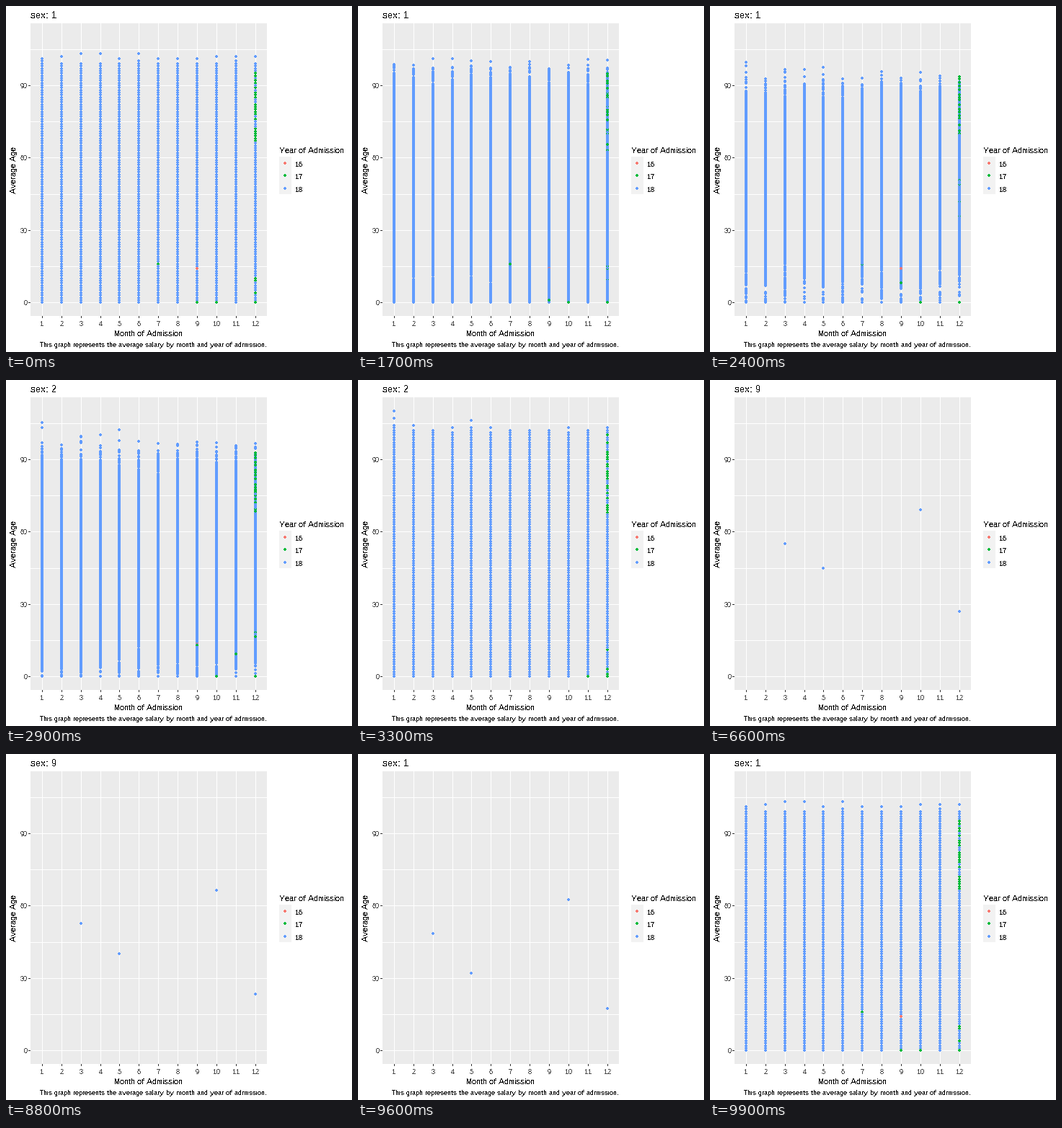
Write a matplotlib script that moves like this. It is 480 px wide and 480 px high and loops after 10000 ms.

```python
import matplotlib.pyplot as plt
import numpy as np
from matplotlib.animation import FuncAnimation
from matplotlib.colors import to_rgba
from matplotlib.patches import Rectangle

SIZE, DPI = 480, 100
PT = 72 / DPI                      # points per pixel
RED, GREEN, BLUE = "#F8766D", "#00BA38", "#619CFF"
LEFT, RIGHT, TOP, BOTTOM = 34, 362, 24, 430
FRAMES, INTERVAL = 100, 100
MONTHS = range(1, 13)

# crisp, fully hinted text
plt.rcParams.update({"font.family": "Liberation Sans",
                     "text.antialiased": False,
                     "text.hinting": "native",
                     "text.hinting_factor": 1})
rng = np.random.default_rng(18)


def px(month):
    return np.rint(22.95 + 26.9 * np.asarray(month, float))


def py(age):
    return np.rint(411.2 - 3.347 * np.asarray(age, float))


def draw_ages(top, n):
    """Random ages: some newborns, few children, a peak near 72."""
    a = np.arange(top + 1)
    w = (0.08 + np.exp(-((a - 72) / 17) ** 2)
         + 0.5 * np.exp(-((a - 30) / 14) ** 2))
    w *= np.clip((103 - a) / 22, 0.01, 1)
    w[0] = 2.5
    return rng.choice(a, n, p=w / w.sum())


def sample(low, high, n, banned=()):
    pool = np.setdiff1d(np.arange(low, high + 1), banned)
    return rng.choice(pool, n, replace=False)


def build_rows():
    """Rows of layer, month, age for sex 1, age for sex 2.

    Layers from back to front: blue crowd, red, green, blue cover.
    """
    rows = []

    def add(layer, month, a, b):
        a, b = np.broadcast_arrays(np.atleast_1d(a), b)
        rows.append(np.column_stack([np.full(a.size, layer),
                                     np.full(a.size, month), a, b]))

    # long stays of December: the oldest become young and the other way round
    old_1 = -np.sort(-sample(66, 96, 20))
    old_2 = -np.sort(-sample(68, 100, 20))
    green_1 = np.r_[0, 4, 9, 10, old_1]
    green_2 = np.r_[0, old_2, 11, 3, 1]
    add(2, 12, green_1, green_2)

    # single early admissions, seen for sex 1 and covered for sex 2
    for layer, month, a, b in ((1, 9, 14, 14), (2, 7, 16, 16),
                               (2, 9, 0, 17), (2, 10, 0, 0)):
        add(layer, month, a, b)
        add(3, month, rng.integers(45, 80), b)
    add(2, 11, 40, 0)
    add(3, 11, 40, 70)

    for m in MONTHS:
        top_1, top_2 = 99 + (m % 5 == 1), 101 + rng.integers(0, 3)
        add(0, m, draw_ages(top_1, 2000), draw_ages(top_2, 2000))
        # every age occurs, and a few people are older than the rest
        all_1, all_2 = np.arange(top_1 + 1), np.arange(top_2 + 1)
        add(0, m, all_1, draw_ages(top_2, all_1.size))
        add(0, m, draw_ages(top_1, all_2.size), all_2)
        add(0, m, rng.integers(101, 104), draw_ages(top_2, 1))
        add(0, m, rng.integers(60, 93), rng.integers(102, 105))
        december = m == 12
        add(3, m, sample(3, 90, 50, green_1 if december else (14, 16)),
            sample(3, 90, 50, green_2 if december else ()))
    for month, age in ((1, 107), (1, 110), (5, 106)):
        add(0, month, 90, age)
    return np.vstack(rows).astype(float)


ROWS = build_rows()
LAYER_RGBA = np.array([to_rgba(c) for c in (BLUE, RED, GREEN, BLUE)])

# the four patients of sex 9: month, age for sex 2, sex 9, sex 1
FEW = np.array([(3, 80, 55, 47), (5, 60, 45, 29),
                (10, 85, 69, 61), (12, 78, 27, 15)], float)


def crowd(t):
    """Visible dots of everyone, t of the way from sex 1 to sex 2."""
    layer, month, a, b = ROWS.T
    y = py(a + (b - a) * t)
    spots = np.unique(np.column_stack([layer, month, y]), axis=0)
    xy = np.column_stack([px(spots[:, 1]), spots[:, 2]])
    return xy, LAYER_RGBA[spots[:, 0].astype(int)]


def few(start, end, t):
    a, b = FEW[:, start], FEW[:, end]
    xy = np.column_stack([px(FEW[:, 0]), py(a + (b - a) * t)])
    return xy, np.tile(LAYER_RGBA[0], (len(xy), 1))


def scene(i):
    """Title digit, dot places and dot colours at step i."""
    if i < 50:
        t = np.clip((i - 16) / 17, 0, 1)
        return "1" if t < 0.5 else "2", *crowd(t)
    if i < 66:
        t = (i - 49) / 17
        xy, col = crowd(1)
        xy4, col4 = few(1, 2, t)
        return ("2" if t < 0.5 else "9",
                np.vstack([xy, xy4]), np.vstack([col, col4]))
    if i < 99:
        t = max(0, (i - 83) / 16)
        return "9" if t < 0.5 else "1", *few(2, 3, t)
    return "1", *crowd(0)


fig = plt.figure(figsize=(SIZE / DPI, SIZE / DPI), dpi=DPI, facecolor="white")
ax = fig.add_axes([0, 0, 1, 1])
ax.set_xlim(0, SIZE)
ax.set_ylim(SIZE, 0)
ax.axis("off")


def box(x, y, w, h, color):
    ax.add_patch(Rectangle((x, y), w, h, fc=color, lw=0, antialiased=False))


def label(x, y, s, size, color="black", **kw):
    return ax.text(x, y, s, fontsize=size * PT, color=color, **kw)


# a four pixel disc: a square without its corner pixels
DISC = [(-1, -2), (1, -2), (1, -1), (2, -1), (2, 1), (1, 1), (1, 2),
        (-1, 2), (-1, 1), (-2, 1), (-2, -1), (-1, -1), (-1, -2)]


def dot_layer(xy, colors):
    return ax.scatter(xy[:, 0], xy[:, 1], s=(4 * PT) ** 2, c=colors,
                      marker=DISC, linewidths=0, antialiaseds=False, zorder=3)


# panel, grid and axes
GREY, TICK = "#4D4D4D", "#333333"
box(LEFT, TOP, RIGHT - LEFT, BOTTOM - TOP, "#EBEBEB")
for age in range(0, 106, 15):
    y = py(age)
    box(LEFT, y, RIGHT - LEFT, 1, "white")
    if age % 30 == 0:
        box(LEFT - 3, y, 3, 1, TICK)
        label(29.5, y + 4, str(age), 9, GREY, ha="right")
for month in MONTHS:
    x = px(month)
    box(x, TOP, 1, BOTTOM - TOP, "white")
    box(x, BOTTOM, 1, 3, TICK)
    label(x, 444, str(month), 9, GREY, ha="center")

label(198, 458, "Month of Admission", 11, ha="center")
label(11.5, 227.5, "Average Age", 11, rotation=90, ha="center", va="center")
label(362, 473, "This graph represents the average salary by month "
      "and year of admission.", 9, ha="right")
title = label(34, 17, "sex: 1", 13)

# legend
label(379, 204, "Year of Admission", 11)
box(379, 209, 17, 52, "#F2F2F2")
for year, y in zip((16, 17, 18), (218, 235, 253)):
    label(401, y + 5, str(year), 9)
dot_layer(np.array([(387, 218), (387, 235), (387, 253)]), [RED, GREEN, BLUE])

dots = dot_layer(*scene(0)[1:])


def update(i):
    sex, xy, colors = scene(i)
    title.set_text(f"sex: {sex}")
    dots.set_offsets(xy)
    dots.set_facecolors(colors)
    return title, dots


def reset():
    return update(0)


anim = FuncAnimation(fig, update, frames=FRAMES, init_func=reset,
                     interval=INTERVAL, repeat=True, repeat_delay=0)
plt.show()
```
